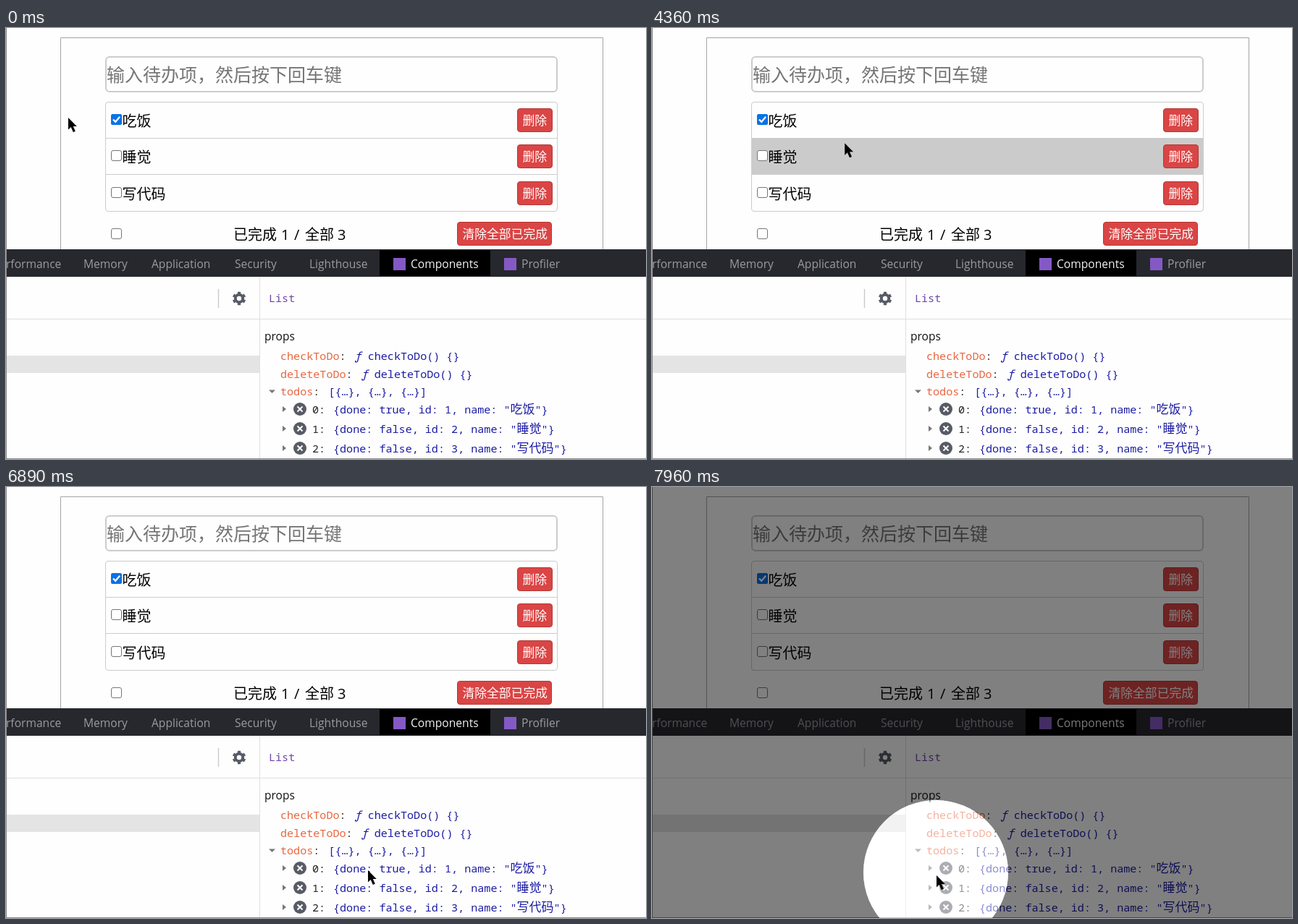
Recreate the animation shown at these times as an HTML page. Size 884 by 596 pixels, loop 7990 ms.

```html
<!DOCTYPE html>
<html lang="zh-CN">
<head>
<meta charset="utf-8">
<style>
html, body { margin: 0; width: 100%; height: 100%; overflow: hidden; background: #fefefe; }
svg { display: block; font-family: "Open Sans", "Noto Sans", "Noto Sans CJK SC", "Noto Sans CJK", sans-serif; }
.cjk { font: 20px "Noto Sans CJK SC", "Noto Sans CJK", sans-serif; }
.hint { font-size: 25px; fill: #757575; }
.btn rect { fill: #da4545; stroke: #b33a37; }
.btn text { font: 16.8px "Noto Sans CJK SC", "Noto Sans CJK", sans-serif; fill: #fff; }
.tab { font-size: 15.6px; fill: #989ba0; }
.code { font: 15.1px "Noto Sans Mono", "Noto Sans CJK SC", "Noto Sans CJK", monospace; fill: #1c1ca4; }
.code .key { fill: #e8663f; }
.code .dark { fill: #222; }
.code .name { font-family: "Noto Sans CJK SC", "Noto Sans CJK", sans-serif; font-size: 17px; font-weight: 300; }
.line { fill: none; stroke: #ccc; }
.box { fill: #fff; stroke: #767676; }
.hover { fill: #cbcbcb; }
.icon { fill: #575b65; }
</style>
</head>
<body>
<svg width="884" height="596" viewBox="0 0 884 596">
  <path d="M75.5 306V13.5H824.5V306" fill="none" stroke="#a5a5a5"/>
  <rect class="line" x="138" y="40" width="623" height="48" rx="5" stroke-width="2"/>
  <text class="cjk hint" x="139" y="74">输入待办项，然后按下回车键</text>
  <g id="rows"></g>
  <path class="line" d="M138 152.5H761M138 202.5H761"/>
  <rect class="line" x="137.5" y="102.5" width="624" height="151" rx="3.5"/>
  <rect class="box" x="145.5" y="277.5" width="14" height="14" rx="2.5"/>
  <text class="cjk" x="314" y="293">已完成</text>
  <text class="cjk" x="413" y="293">全部</text>
  <g font-size="20">
    <text id="count" x="380" y="293">1</text><text x="398" y="293">/</text><text x="458" y="293">3</text>
  </g>
  <g id="clear"></g>

  <rect y="306" width="884" height="38" fill="#27282d"/>
  <rect x="516" y="307" width="153" height="36"/>
  <g id="tabs" class="tab"></g>
  <path d="M535 318h17v17h-17zM688 318h17v17h-17z" fill="#8459c6"/>

  <path class="line" d="M293.5 361V387" stroke-width="1.5"/>
  <path d="M350.5 344V595M0 402.5H884" stroke="#dfdfdf"/>
  <rect y="453" width="350" height="24" fill="#e4e4e4"/>
  <g fill="none" stroke="#575b65" transform="translate(322 374)">
    <circle r="5.2" stroke-width="4"/>
    <circle r="7.8" stroke-width="3" pathLength="12" stroke-dasharray="1" stroke-dashoffset="-.5"/>
  </g>
  <text class="code" x="363" y="379" style="fill:#6f46a8">List</text>
  <text x="357" y="432" font-size="15.5" fill="#111">props</text>
  <path d="M363 500.5h9l-4.5 4.5z" fill="#777"/>
  <g id="props" class="code"></g>
  <path d="M.5 0V596M0 595.5H884" fill="none" stroke="#8c8c8c"/>

  <path id="shade" fill-rule="evenodd"/>
  <circle id="glow" fill="#fff"/>
  <path id="cursor" d="M0 0V16.5L3.7 13 6.8 20 9.8 18.7 6.8 12H11.8Z"/>
</svg>
<script>
const LOOP = 7990;
const $ = id => document.getElementById(id);
const todos = ['吃饭', '睡觉', '写代码'];
const rowTop = i => 102 + Math.floor(50.5 * i);

const button = (x, y, w, label) => `<g class="btn">
  <rect x="${x + .5}" y="${y + .5}" width="${w - 1}" height="32" rx="3.5"/>
  <text x="${x + 7.5}" y="${y + 23}">${label}</text></g>`;

$('rows').innerHTML = todos.map((name, i) => {
  const y = rowTop(i);
  return `<rect class="hover" x="137" y="${y}" width="625" height="51"/>
    <rect class="box" x="145.5" y="${y + 17.5}" width="14" height="14" rx="2.5"/>
    <text class="cjk" x="160.5" y="${y + 33.5}">${name}</text>
    ${button(706, y + 9, 49, '删除')}`;
}).join('') + `<g id="tick">
    <rect x="145" y="119" width="15" height="15" rx="2.5" fill="#0b72e7"/>
    <path d="M148 126.5l3.2 3.3 6-7" fill="none" stroke="#fff" stroke-width="2.2"/>
  </g>`;

$('clear').innerHTML = button(623, 268, 131, '清除全部已完成');

const tabs = { rformance: 0, Memory: 107, Application: 201, Security: 316, Lighthouse: 419, Components: 559, Profiler: 712 };
$('tabs').innerHTML = Object.entries(tabs).map(([label, x]) =>
  `<text x="${x}" y="332"${label === 'Components' ? ' fill="#f2f2f2"' : ''}>${label}</text>`).join('');

const method = name => `<tspan font-style="italic" dx="12">ƒ</tspan> ${name}() {}`;
const fields = {
  checkToDo: method('checkToDo'),
  deleteToDo: method('deleteToDo'),
  todos: '<tspan dx="12">[{…}, {…}, {…}]</tspan>'
};
$('props').innerHTML = Object.entries(fields).map(([key, value], i) =>
  `<text x="379" y="${459 + 24.5 * i}"><tspan class="key">${key}</tspan><tspan class="dark">:</tspan>${value}</text>`
).join('') + todos.map((name, i) => `<g transform="translate(0 ${527 + 27 * i})">
    <path d="M382 -4v8l5 -4z" fill="#777"/>
    <circle class="icon" cx="406" r="9"/>
    <path d="M402.5 -3.5l7 7m0 -7l-7 7" stroke="#fff" stroke-width="2"/>
    <text x="423" y="6" class="dark">${i}:</text>
    <text x="452" y="6">{done: <tspan class="done">${!i}</tspan>, id: ${i + 1}, name: "<tspan class="name">${name}</tspan>"}</text>
  </g>`).join('');

const hovers = document.querySelectorAll('.hover');
const firstDone = document.querySelector('.done');

// Pointer moves: start time, end time, x and y reached, optional loop radius
const moves = [
  [20, 50, 86, 112],
  [530, 1350, 105, 112, 40],
  [1350, 1580, 136, 150],
  [1580, 1830, 156, 130],
  [4270, 4360, 265, 158],
  [4360, 4840, 552, 458],
  [5020, 5230, 544, 549],
  [5680, 5830, 491, 539],
  [5950, 6890, 500, 530],
  [7450, 7630, 511, 524],
  [7660, 7960, 393, 537]
];

const progress = (t, from, to) => Math.min(Math.max((t - from) / (to - from), 0), 1);

function pointer(t) {
  let x = 86, y = 124;
  for (const [from, to, toX, toY, radius = 0] of moves) {
    const k = progress(t, from, to);
    const ease = k * (2 - k);
    const angle = 2 * Math.PI * k;
    x += (toX - x) * ease + radius * (Math.cos(angle) - 1);
    y += (toY - y) * ease - radius * Math.sin(angle);
  }
  return [x, y];
}

// Dims the stage and fades what lies inside a shrinking circle
function spotlight(t, x, y) {
  const ease = 1 - (1 - progress(t, 7474, 7974)) ** 4;
  const r = 900 - 800 * ease;
  const cx = x - 1, cy = Math.min(y + 1, 533);
  $('shade').setAttribute('d', `M0 0H884V596H0ZM${cx - r} ${cy}a${r} ${r} 0 1 0 ${2 * r} 0a${r} ${r} 0 1 0 ${-2 * r} 0Z`);
  $('shade').setAttribute('fill-opacity', ease / 2);
  const glow = { cx, cy, r, 'fill-opacity': ease / 2 };
  for (const key in glow) $('glow').setAttribute(key, glow[key]);
}

function draw(t) {
  const [x, y] = pointer(t);
  const inList = x >= 137 && x < 762;
  hovers.forEach((h, i) => {
    h.style.display = inList && y >= rowTop(i) && y < rowTop(i + 1) ? '' : 'none';
  });

  const checked = t < 2530 || t >= 3370;
  $('tick').style.display = checked ? '' : 'none';
  $('count').textContent = +checked;
  firstDone.textContent = t < 3030 || t >= 4020;

  spotlight(t, x, y);
  $('cursor').setAttribute('transform', `translate(${x} ${y})`);
}

const start = performance.now();
function frame() {
  draw((performance.now() - start) % LOOP);
  requestAnimationFrame(frame);
}
frame();
</script>
</body>
</html>
```
